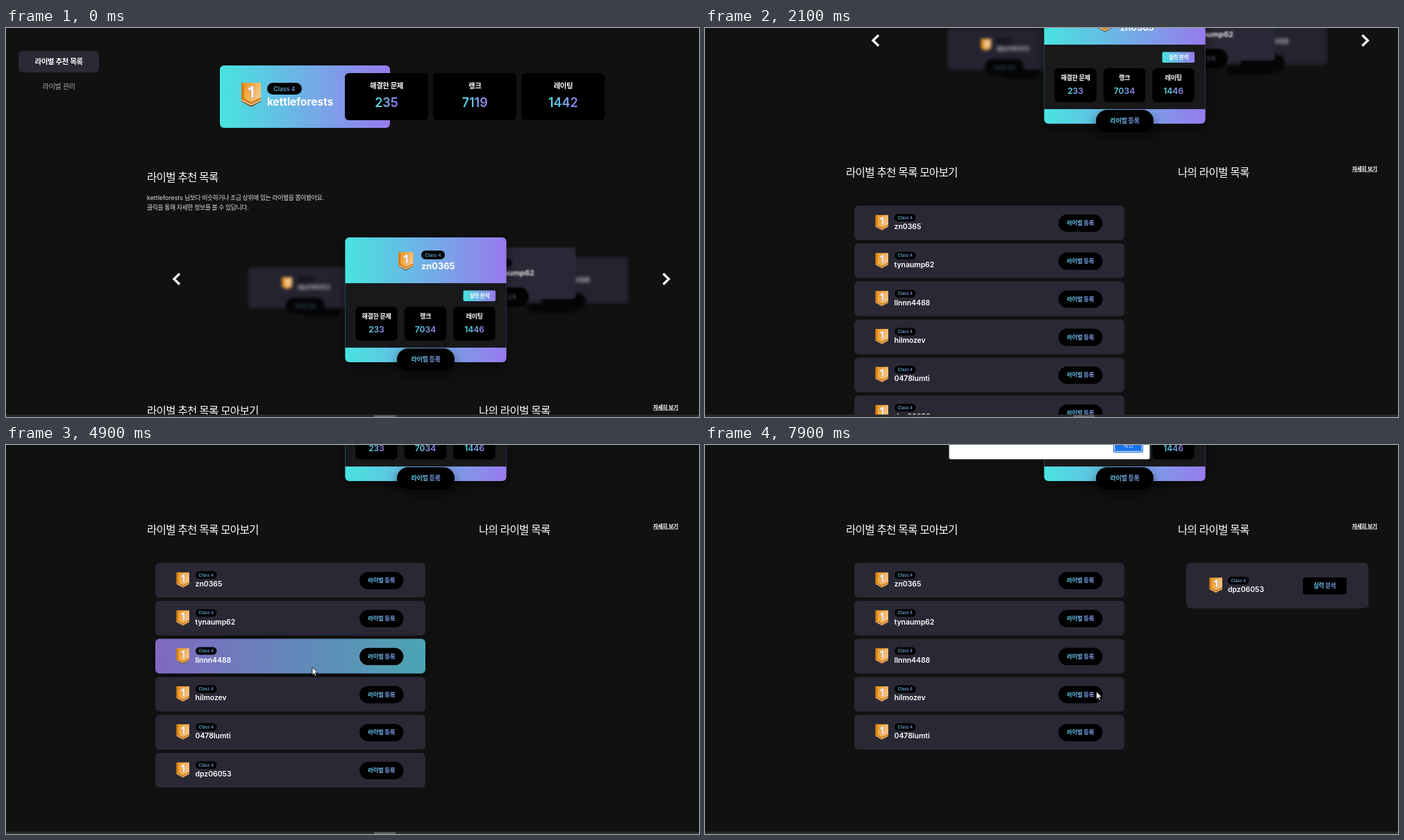
An HTML page for the animation above (8000 ms loop, 998x561 px).

```html
<!DOCTYPE html>
<html lang="ko">
<head>
<meta charset="utf-8">
<title>라이벌 추천 목록</title>
<style>
  html, body { margin: 0; height: 100%; overflow: hidden; background: #111; }
  svg { display: block; width: 100vw; height: 100vh; }
  text { fill: #fff; white-space: pre; }
  .ko { font-family: "Noto Sans CJK KR", "Noto Sans CJK JP", sans-serif; letter-spacing: -.047em; }
  .en { font-family: Inter, sans-serif; letter-spacing: 0; }
  .soft { filter: blur(2px); }
  .raised { filter: drop-shadow(0 6px 8px rgba(0,0,0,.5)); }
</style>
</head>
<body>
<svg viewBox="0 0 998 561">
  <defs>
    <linearGradient id="brand"><stop stop-color="#48e4df"/><stop offset="1" stop-color="#987aed"/></linearGradient>
    <linearGradient id="brandWide" x1="-.5" x2="1.5"><stop stop-color="#48e4df"/><stop offset="1" stop-color="#987aed"/></linearGradient>
    <linearGradient id="litRow"><stop stop-color="#7f69c0"/><stop offset="1" stop-color="#4ba4b4"/></linearGradient>
    <linearGradient id="gold" y2=".5"><stop stop-color="#e8921c"/><stop offset=".45" stop-color="#f5aa3c"/><stop offset="1" stop-color="#fbc68c"/></linearGradient>
    <g id="medal">
      <path d="M1 3H29V28L15 36 1 28Z" fill="#7a4a22"/>
      <path d="M1 1H29V25L15 32 1 25Z" fill="url(#gold)"/>
      <path d="M1 1 5 4V24L15 29 29 22V25L15 32 1 25Z" fill="#d27f16"/>
      <path d="M1 26 15 33 29 26" fill="none" stroke="#f7d9ae" stroke-width="1.4"/>
      <path d="M10 9 16 5H19V23H14.5V11L11 13Z" fill="#f1edf0" stroke="#b58a5c" stroke-width=".7"/>
    </g>
  </defs>
  <rect width="998" height="561" fill="#111"/>
  <g id="page"></g>
  <rect y="557.5" width="998" height="3.5" fill="#2a2a2a"/>
  <rect id="thumb" x="530" y="558.5" width="31" height="2.5" fill="#626262"/>
  <g id="dialog"></g>
  <path id="arrow" d="M0 0V11.2L2.6 8.8 4.4 12.8 6.2 12 4.5 8.1H8Z" fill="#fff" stroke="#000" stroke-width=".8"/>
  <path id="hand" d="M-1.2 1Q0-.8 1.2 1V5.2L5.4 6.2Q6.4 6.6 6.2 8L5.2 11.5V14H-2V12L-5 8Q-5 6.4-3.4 6.8L-1.2 8.6Z" fill="#fff" stroke="#000" stroke-width=".8"/>
</svg>
<script>
const LOOP = 8000, STEP = 100;
const ROW_TOP = 600, ROW_PITCH = 54.8;
const me = 'kettleforests';
const rivals = ['zn0365', 'tynaump62', 'llnnn4488', 'hilmozev', '0478lumti', 'dpz06053'];
const $ = id => document.getElementById(id);

// Drawing helpers
const rect = (x, y, w, h, r, fill, extra = '') =>
  `<rect x="${x}" y="${y}" width="${w}" height="${h}" rx="${r}" fill="${fill}" ${extra}/>`;
const text = (lang, str, x, y, size, { weight = 600, anchor = 'start', fill = '#fff', extra = '' } = {}) =>
  `<text class="${lang}" x="${x}" y="${y}" font-size="${size}" font-weight="${weight}" text-anchor="${anchor}" style="fill:${fill}" ${extra}>${str}</text>`;
const ko = (...args) => text('ko', ...args);
const en = (...args) => text('en', ...args);
const mid = { anchor: 'middle' };
const tinted = { anchor: 'middle', fill: 'url(#brandWide)' };
const medal = (x, y, scale) => `<use href="#medal" transform="translate(${x} ${y}) scale(${scale})"/>`;
const badge = (x, y, w, h, size) =>
  rect(x, y, w, h, h / 2, '#000') +
  en('Class 4', x + w / 2, y + h / 2 + size * .36, size, { ...tinted, weight: 500 });

const labels = ['해결한 문제', '랭크', '레이팅'];
const stats = (values, x, y, w, h, pitch, labelY, labelSize, valueY, valueSize) =>
  values.map((value, i) => {
    const left = x + i * pitch, center = left + w / 2;
    return rect(left, y, w, h, 6, '#000') +
      ko(labels[i], center, labelY, labelSize, mid) +
      en(value, center, valueY, valueSize, { anchor: 'middle', fill: 'url(#brand)' });
  }).join('');

const sidebar = () =>
  rect(18, 33, 116, 31, 6, '#2b2935') +
  ko('라이벌 추천 목록', 76, 52, 10.5, mid) +
  ko('라이벌 관리', 76, 87.5, 10.2, { anchor: 'middle', weight: 400, fill: '#aaa' });

const header = () =>
  rect(308, 54, 245, 90, 6, 'url(#brand)') +
  medal(338, 78, 1) + badge(376, 79, 50, 17, 8.8) +
  en(me, 376, 112, 15.4, { weight: 700 }) +
  stats(['235', '7119', '1442'], 488, 65, 120, 68, 127.2, 87.3, 10.4, 114, 18);

const intro = () => {
  const style = { weight: 400, fill: '#ddd' };
  return ko('라이벌 추천 목록', 203, 220.5, 15.6, { weight: 500 }) +
    ko(`<tspan class="en">${me}</tspan> 님보다 비슷하거나 조금 상위에 있는 라이벌을 뽑아봤어요.`, 203, 248, 8.9, style) +
    ko('클릭을 통해 자세한 정보를 볼 수 있답니다.', 203, 261.7, 8.9, style);
};

const sideCards = () => `<g class="soft">` +
  rect(425, 398, 56, 19, 9, '#060608') +
  rect(349, 345, 160, 59, 5, '#252330') +
  rect(419, 358, 24, 9, 4, '#17161f') + medal(397, 359, .52) +
  en(rivals[5], 420, 377, 9.4, { fill: '#bbb' }) +
  rect(403, 389, 56, 23, 11, '#040405') +
  ko('라이벌 등록', 431, 404, 6.5, { anchor: 'middle', fill: '#2b4754' }) +
  rect(750, 391, 70, 20, 10, '#050506') +
  rect(700, 330, 196, 67, 5, '#252330') +
  en(rivals[2], 841, 367, 10, { anchor: 'end', fill: '#bbb' }) +
  rect(771, 382, 64, 25, 12, '#050506') + `</g>` +
  `<g style="filter:blur(1.2px)">` +
  rect(660, 316.5, 160.5, 74.5, 5, '#2a2836') +
  rect(703, 333, 26, 12, 6, '#0c0c10') +
  en(rivals[1], 761, 357, 11, { anchor: 'end', weight: 700, fill: '#ddd' }) +
  rect(683, 374, 70, 28, 14, '#030304') +
  ko('라이벌 등록', 735, 391, 7.5, { anchor: 'end', fill: '#3a4250' }) + `</g>`;

const chevron = (x, dir) =>
  `<path d="M${x + 4 * dir} 354.2L${x - 4 * dir} 362 ${x + 4 * dir} 369.8" fill="none" stroke="#f4f4f4" stroke-width="3.4"/>`;

const mainCard = () => `<g class="raised">` +
  rect(488.4, 302, 232.2, 180, 6, 'url(#brand)') +
  rect(488.4, 368, 232.2, 93, 0, '#19191c') + `</g>` +
  medal(564.5, 322.5, .76) + badge(598, 321, 34, 12.6, 6.5) +
  en(rivals[0], 598, 347.5, 12.8, { weight: 700 }) +
  rect(658.5, 378.5, 46.5, 15.5, 2, 'url(#brand)') +
  ko('실력 분석', 681.8, 389, 7.7, { anchor: 'middle', weight: 700 }) +
  stats(['233', '7034', '1446'], 503.3, 402, 60.4, 49, 70.5, 419.3, 9.1, 438.8, 12) +
  rect(563, 462, 83, 32, 16, '#000', 'class="raised"') +
  ko('라이벌 등록', 604.5, 481.3, 9.1, tinted);

const lists = () =>
  ko('라이벌 추천 목록 모아보기', 203, 557.5, 15.6, { weight: 500 }) +
  ko('나의 라이벌 목록', 681, 557.5, 15.6, { weight: 500 }) +
  ko('자세히 보기', 932, 549.7, 7.8, { weight: 700, extra: 'text-decoration="underline"' }) +
  rivals.map((name, i) => `<g id="row${i}" transform="translate(0 ${ROW_TOP + i * ROW_PITCH})">` +
    rect(215, 0, 389, 50, 6, '#2a2834') +
    rect(215, 0, 389, 50, 6, 'url(#litRow)', 'class="lit raised"') +
    medal(245, 13, .65) + badge(273, 12, 30.5, 11, 6.1) +
    en(name, 272.6, 34, 10.4) +
    rect(509, 13, 63.5, 25, 12.5, '#000') +
    rect(508.7, 12.7, 64, 25.6, 12.8, 'none', 'class="ring" stroke="#fff" stroke-width=".9"') +
    `<g class="label">${ko('라이벌 등록', 540.6, 28.3, 8.5, tinted)}</g></g>`).join('') +
  `<g id="myRival">` +
    rect(693, 600, 262.5, 65.5, 6, '#2a2834') +
    medal(726, 620.5, .65) + badge(753, 620, 30.5, 11, 6.1) +
    en(rivals[5], 753, 642, 10.4) +
    rect(861, 621, 63, 24.5, 4, '#000') +
    ko('실력 분석', 892.3, 636.3, 8.6, tinted) + `</g>`;

$('page').innerHTML = sidebar() + header() + intro() + sideCards() +
  chevron(246, 1) + chevron(950.5, -1) + mainCard() + lists();

$('dialog').innerHTML =
  rect(351.5, -20, 289, 40.5, 2.5, '#fff') +
  rect(588, -14, 43, 25, 3, '#1a73e8') +
  rect(589.7, -14, 39.6, 23.3, 2, '#1a73e8', 'stroke="#fff" stroke-width="1"') +
  ko('확인', 609.5, 3, 8, { anchor: 'middle', weight: 500 });

// Timelines: [time, ...values]
const scrollPath = [[1000, 0], [1100, 40], [1200, 125], [1300, 172], [1400, 172], [1500, 193],
  [1600, 234], [1800, 290], [2000, 336], [2100, 344], [4300, 344], [4400, 362], [4500, 402], [4700, 430]];
const cursorPath = [[2500, 620, 58], [2700, 618, 190], [2800, 600, 262], [3000, 588, 297], [3500, 588, 297],
  [3600, 583, 302.5], [3700, 580, 316], [4200, 560, 350], [4500, 560, 350], [4900, 441, 320.5],
  [5100, 440, 340], [5200, 442, 370], [5300, 442, 370], [5400, 446, 395], [5600, 450, 422],
  [5700, 450, 422], [5800, 455.3, 459], [6200, 480, 482], [6600, 538, 465], [6700, 542, 462],
  [7600, 542, 462], [7700, 559, 442], [7800, 559, 442], [7900, 563.5, 355.5]];
const hovers = [[0, -1], [2800, 0], [3600, -1], [3700, 1], [4500, -1], [4900, 2],
  [5100, 3], [5400, 4], [5800, 5], [7300, -1]];

function sample(path, t) {
  const next = path.findIndex(key => key[0] > t);
  if (next < 0) return path.at(-1).slice(1);
  if (next === 0) return path[0].slice(1);
  const a = path[next - 1], b = path[next], k = (t - a[0]) / (b[0] - a[0]);
  return a.slice(1).map((v, i) => v + (b[i + 1] - v) * k);
}

const show = (el, opacity) => { el.style.opacity = opacity; };

function draw(t) {
  const [scroll] = sample(scrollPath, t);
  $('page').setAttribute('transform', `translate(0 ${-scroll})`);

  const current = hovers.findLastIndex(([start]) => start <= t);
  const [since, active] = hovers[current];
  const previous = current ? hovers[current - 1][1] : -1;
  const fade = Math.min(1, (t - since + 40) / 300);
  const swapped = t >= 7300;
  rivals.forEach((_, i) => {
    const row = $('row' + i);
    show(row.querySelector('.lit'), +(i === active));
    show(row.querySelector('.ring'), i === active ? fade : i === previous ? 1 - fade : 0);
    show(row.querySelector('.label'), i === 5 && t >= 6700 ? .6 : 1);
  });
  show($('row5'), +!swapped);
  show($('myRival'), +swapped);
  show($('thumb'), +!swapped);
  show($('dialog'), +(t >= 7200));

  const [x, y] = sample(cursorPath, t);
  const pointing = t >= 6600 && t < 7700;
  for (const id of ['arrow', 'hand']) $(id).setAttribute('transform', `translate(${x} ${y})`);
  show($('arrow'), +(t >= 2500 && !pointing));
  show($('hand'), +pointing);
}

const origin = performance.now();
function tick() {
  const t = (performance.now() - origin) % LOOP;
  draw(Math.floor(t / STEP) * STEP);
  requestAnimationFrame(tick);
}
tick();
</script>
</body>
</html>
```
